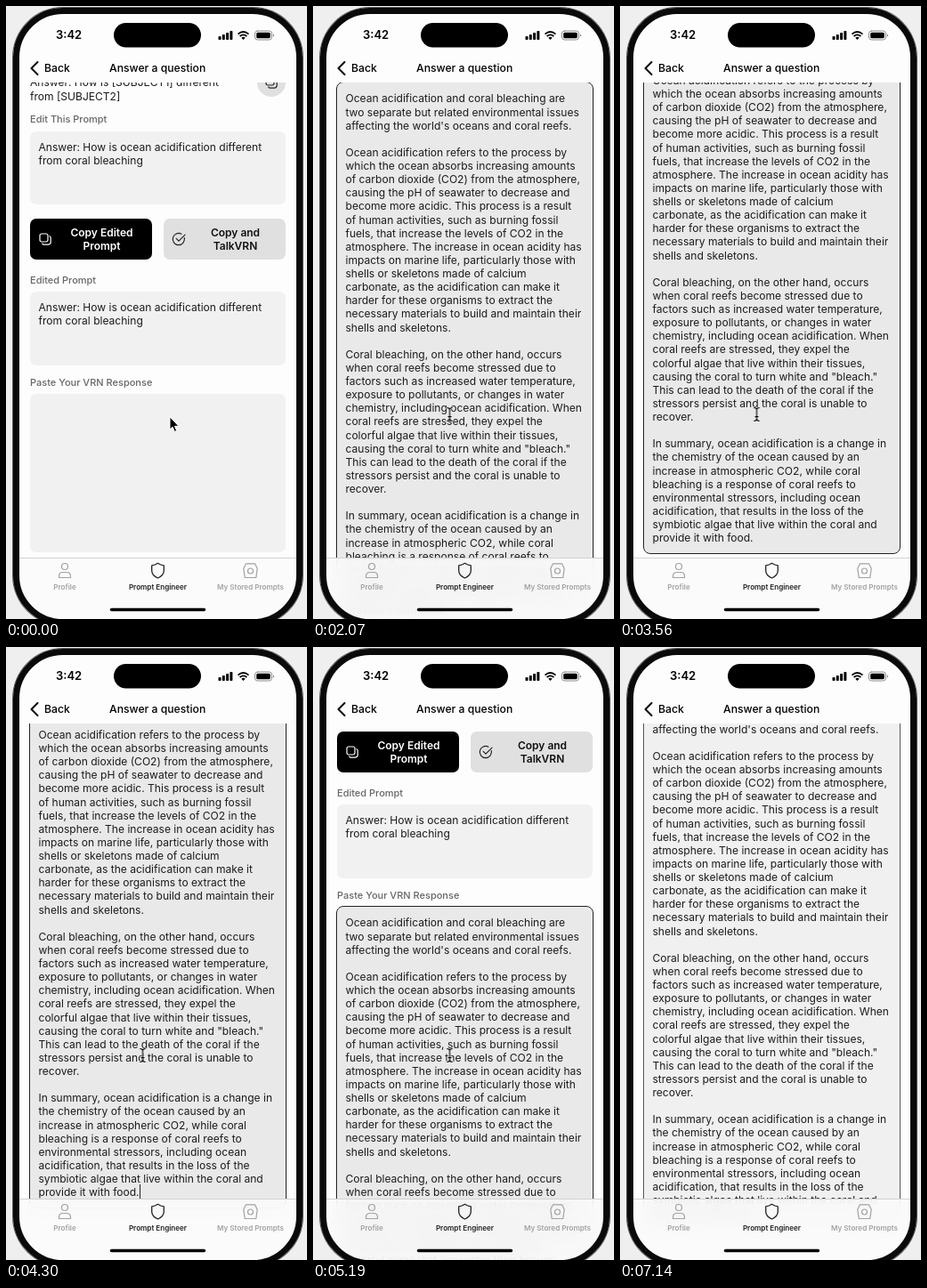
These frames come from a looping animation (338x689 px, 7160 ms). An HTML page:

```html
<!DOCTYPE html>
<html lang="en">
<head>
<meta charset="utf-8">
<title>Answer a question</title>
<style>
  html, body { margin: 0; width: 100%; height: 100%; overflow: hidden; background: #efefef; }
  .stage {
    position: relative; width: 338px; height: 689px; overflow: hidden;
    background: #fdfdfd; color: #1c1c1c;
    font: 12.05px/15.12px Inter, Roboto, sans-serif;
  }
  .stage * { position: absolute; box-sizing: border-box; margin: 0; white-space: pre; }
  svg { left: 0; top: 0; overflow: visible; fill: none; stroke-linecap: round; stroke-linejoin: round; }
  .page, .field, .pasted, .caret, .cursor { animation: 7160ms step-end infinite; }

  /* scrolling page */
  .page { inset: 0; animation-name: scroll; }
  .label { left: 27px; font-size: 11px; font-weight: 500; color: #666; }
  .box { left: 27px; width: 287px; border-radius: 7px; background: #f1f1f1; }
  .box p { left: 9.5px; top: 10px; }
  .button {
    top: 239px; width: 137px; height: 46px; padding: 8px 0 0 24px; border-radius: 7px;
    font-size: 12px; font-weight: 600; text-align: center;
  }
  .dark { left: 27px; background: #000; color: #fff; }
  .light { left: 177px; background: #e0e0e0; color: #111; }
  .round { left: 282px; top: 70px; width: 32px; height: 32px; border-radius: 50%; background: #e0e0e0; }
  .field {
    left: 26px; top: 435px; width: 289px; height: 180px;
    border: 1.5px solid transparent; border-radius: 8px;
    background: #f1f1f1 padding-box; animation-name: field;
  }
  .pasted { left: 36.5px; top: 446.4px; line-height: 15.118px; visibility: hidden; animation-name: pasted; }
  .caret { width: 1px; height: 16px; background: #222; visibility: hidden; }
  .first { left: 37px; top: 446px; animation-name: caret-first; }
  .last { left: 150px; top: 1020px; animation-name: caret-last; }

  /* fixed bars */
  .nav { left: 0; top: 0; width: 338px; height: 86px; background: #fdfdfd; color: #000; }
  .nav p { font-size: 12.2px; font-weight: 500; top: 62.4px; }
  .nav .clock { left: 56px; top: 25.4px; font-size: 13px; font-weight: 600; }
  .tabs {
    left: 0; top: 620px; width: 338px; height: 69px; border-top: 1px solid #d2d2d2;
    background: rgba(251, 251, 251, .88); backdrop-filter: blur(10px);
  }
  .tabs p { top: 24.5px; transform: translateX(-50%); font-size: 8.1px; font-weight: 600; color: #a2a2a2; }
  .tabs .on { color: #222; }
  .phone {
    left: 8px; top: 2px; width: 325px; height: 694px; border: 7px solid #0a0a0a;
    border-radius: 56px; box-shadow: 0 0 0 1px #5c5c5c, 0 0 0 60px #efefef;
  }

  /* pointer */
  .cursor { left: 0; top: 0; visibility: hidden; }
  .arrow { animation-name: arrow; }
  .beam { animation-name: beam; }

  @keyframes scroll {
    0% { transform: none; }
    28.91% { transform: translateY(-350px); }
    37.29% { transform: translateY(-389px); }
    39.385% { transform: translateY(-431px); }
    60.055% { transform: translateY(-416px); }
    62.011% { transform: translateY(-262px); }
    64.106% { transform: translateY(-126px); }
    66.201% { transform: translateY(-82px); }
    72.486% { transform: translateY(-144px); }
    74.581% { transform: translateY(-320px); }
    76.675% { transform: translateY(-392px); }
  }
  @keyframes field {
    0% { height: 180px; background-color: #f1f1f1; border-color: transparent; }
    16.62% { height: 180px; background-color: #ededed; border-color: #888; }
    18.575% { height: 180px; background-color: #e9e9e9; border-color: #222; }
    28.91% { height: 612px; background-color: #e9e9e9; border-color: #222; }
    99.72% { height: 612px; background-color: #f0f0f0; border-color: #555; }
  }
  @keyframes pasted { 0% { visibility: hidden; } 28.91% { visibility: visible; } }
  @keyframes caret-first {
    0%, 22.765% { visibility: hidden; }
    18.575% { visibility: visible; }
  }
  @keyframes caret-last {
    0%, 49.72%, 64.106% { visibility: hidden; }
    43.435%, 57.96% { visibility: visible; }
  }
  @keyframes arrow {
    0% { visibility: visible; transform: translate(184px, 462px); }
    12.43% { visibility: hidden; }
    85.055% { visibility: visible; transform: translate(246.5px, 594.5px); }
    87.15% { visibility: visible; transform: translate(263px, 657px); }
    89.245% { visibility: visible; transform: translate(267px, 661px); }
    91.34% { visibility: hidden; }
  }
  @keyframes beam {
    0% { visibility: hidden; }
    12.43% { visibility: visible; transform: translate(160.5px, 462px); }
    14.525% { visibility: visible; transform: translate(153.5px, 459px); }
    85.055% { visibility: hidden; }
  }
</style>
</head>
<body>
<div class="stage">
  <div class="page">
    <p style="left:27px;top:78.4px">Answer: How is [SUBJECT1] different
from [SUBJECT2]</p>
    <div class="round"></div>
    <p class="label" style="top:119.5px">Edit This Prompt</p>
    <div class="box" style="top:141px;height:82px"><p>Answer: How is ocean acidification different
from coral bleaching</p></div>
    <div class="button dark">Copy Edited
Prompt</div>
    <div class="button light">Copy and
TalkVRN</div>
    <p class="label" style="top:300.5px">Edited Prompt</p>
    <div class="box" style="top:321px;height:83px"><p>Answer: How is ocean acidification different
from coral bleaching</p></div>
    <p class="label" style="top:415.5px">Paste Your VRN Response</p>
    <div class="field"></div>
    <p class="pasted">Ocean acidification and coral bleaching are
two separate but related environmental issues
affecting the world's oceans and coral reefs.

Ocean acidification refers to the process by
which the ocean absorbs increasing amounts
of carbon dioxide (CO2) from the atmosphere,
causing the pH of seawater to decrease and
become more acidic. This process is a result
of human activities, such as burning fossil
fuels, that increase the levels of CO2 in the
atmosphere. The increase in ocean acidity has
impacts on marine life, particularly those with
shells or skeletons made of calcium
carbonate, as the acidification can make it
harder for these organisms to extract the
necessary materials to build and maintain their
shells and skeletons.

Coral bleaching, on the other hand, occurs
when coral reefs become stressed due to
factors such as increased water temperature,
exposure to pollutants, or changes in water
chemistry, including ocean acidification. When
coral reefs are stressed, they expel the
colorful algae that live within their tissues,
causing the coral to turn white and "bleach."
This can lead to the death of the coral if the
stressors persist and the coral is unable to
recover.

In summary, ocean acidification is a change in
the chemistry of the ocean caused by an
increase in atmospheric CO2, while coral
bleaching is a response of coral reefs to
environmental stressors, including ocean
acidification, that results in the loss of the
symbiotic algae that live within the coral and
provide it with food.</p>
    <i class="caret first"></i>
    <i class="caret last"></i>
    <svg width="338" height="689" stroke-width="1.2">
      <defs>
        <g id="copy">
          <rect x="-6" y="-6" width="9" height="9" rx="2"/>
          <path d="M5 -3.3Q6.2 -2.8 6.2 -1.4V3.2Q6.2 6.2 3.2 6.2H-1.4Q-2.8 6.2 -3.3 5"/>
        </g>
      </defs>
      <use href="#copy" x="44" y="262" stroke="#fff"/>
      <use href="#copy" x="298" y="86" stroke="#222"/>
      <path d="M200.3 260.5A6.6 6.6 0 1 1 197 256.2M191.2 261.3L194 264.2L201 257.2" stroke="#222"/>
    </svg>
  </div>

  <div class="nav">
    <p class="clock">3:42</p>
    <p style="left:43px">Back</p>
    <p style="left:116px">Answer a question</p>
  </div>
  <div class="tabs">
    <p style="left:66px">Profile</p>
    <p class="on" style="left:170.5px">Prompt Engineer</p>
    <p style="left:274.5px">My Stored Prompts</p>
  </div>
  <div class="phone"></div>

  <svg width="338" height="689">
    <rect x="121" y="19" width="98" height="27.5" rx="13.7" fill="#000"/>
    <path d="M35.5 63L28.5 70L35.5 77" stroke="#000" stroke-width="2"/>
    <g fill="#000">
      <rect x="238.5" y="34" width="3" height="4" rx=".8"/>
      <rect x="242.8" y="32" width="3" height="6" rx=".8"/>
      <rect x="247.1" y="30" width="3" height="8" rx=".8"/>
      <rect x="251.4" y="28" width="3" height="10" rx=".8"/>
      <rect x="281.2" y="29.7" width="15.6" height="6.6" rx="1.6"/>
      <path d="M300 31.3Q301.4 33 300 34.7Z"/>
      <path d="M266.5 38L264.3 35.7Q266.5 33.9 268.7 35.7Z"/>
    </g>
    <path d="M260.5 31.6Q266.5 26.4 272.5 31.6M262.6 34Q266.5 30.6 270.4 34" stroke="#000" stroke-width="1.7" stroke-linecap="butt"/>
    <rect x="279.5" y="28" width="19" height="10" rx="3" stroke="#8c8c8c"/>
    <g stroke="#a2a2a2" stroke-width="1.2">
      <circle cx="66" cy="630" r="3.5"/>
      <path d="M59.5 642.5V641Q59.5 636.5 64 636.5H68Q72.5 636.5 72.5 641V642.5Z"/>
      <path d="M269.5 626.8H279.5L282.2 632.2L280.8 642.5H268.2L266.8 632.2Z"/>
      <circle cx="274.5" cy="635" r="3"/>
    </g>
    <path d="M170.5 626.3Q173.5 628.6 177.3 628.8V634.5Q177.3 640 170.5 643Q163.7 640 163.7 634.5V628.8Q167.5 628.6 170.5 626.3Z" stroke="#222" stroke-width="1.3"/>
    <path d="M118.5 678.5H222.5" stroke="#000" stroke-width="3.4"/>
  </svg>

  <svg class="cursor arrow" width="12" height="19">
    <path d="M0 0V14L3.1 11.2L5.3 16.4L7.7 15.4L5.5 10.3H9.7Z" fill="#000" stroke="#fff" stroke-width="1"/>
  </svg>
  <svg class="cursor beam" width="8" height="17">
    <defs><path id="ibeam" d="M-2.8 -7.3Q0 -7.3 0 -5.3Q0 -7.3 2.8 -7.3M0 -5.3V5.3M-2.8 7.3Q0 7.3 0 5.3Q0 7.3 2.8 7.3M-1.6 2.6H1.6"/></defs>
    <use href="#ibeam" stroke="#fff" stroke-width="2.6"/>
    <use href="#ibeam" stroke="#000" stroke-width="1.2"/>
  </svg>
</div>
</body>
</html>
```
